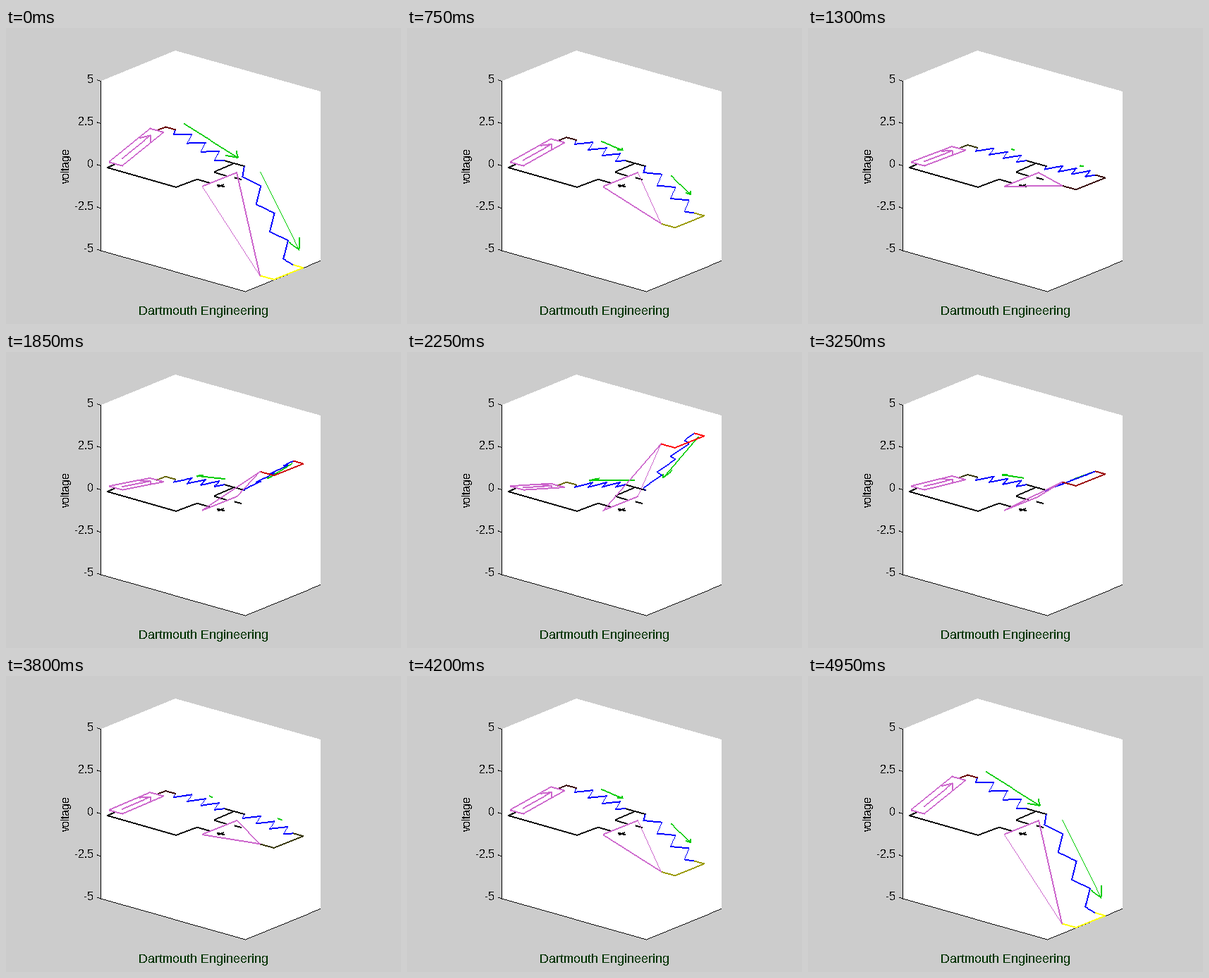
These frames come from a looping animation (560x420 px, 5 s). A matplotlib script:

```python
import numpy as np
import matplotlib.pyplot as plt
from matplotlib.animation import FuncAnimation

W, H, DPI = 560, 420, 100
FRAMES, INTERVAL = 100, 50
PX = 72 / DPI                  # one pixel in points
VOLT = 24.05                   # pixels per volt
GAIN = 5
SX, SY = 58 / 204, -44 / 107   # screen slopes of the two floor axes
BLACK, BLUE = (0, 0, 0), (0, 0, 1)
PINK, GREEN = (0.8, 0.4, 0.8), (0, 0.8, 0)
R_LEN, R_STEP, R_HALF = 69.6, 9.65, 8.2   # resistor length, zigzag step, half width

# Crisp, fully hinted text without smoothing
plt.rcParams.update({
    "font.family": "Liberation Sans",
    "text.hinting": "native",
    "text.hinting_factor": 1,
    "text.antialiased": False,
    "toolbar": "None",
})

fig = plt.figure(figsize=(W / DPI, H / DPI), dpi=DPI, facecolor="#cccccc")
ax = fig.add_axes([0, 0, 1, 1])
ax.axis("off")


def rail(x):
    """Floor height of the line that carries both resistors."""
    return 192 + SX * (x - 323)


def lift(points, z):
    return [(x, y - VOLT * z) for x, y in points]


def tilted(x, x0, v0, v1, side=0):
    """Point on a resistor's sloping plane, moved sideways by `side` pixels."""
    z = v0 + (v1 - v0) * (x - x0) / R_LEN
    return x + side, rail(x) + SY * side - VOLT * z


def resistor(x0, v0, v1):
    first = x0 + (R_LEN - 6 * R_STEP) / 2
    peaks = [tilted(first + k * R_STEP, x0, v0, v1, R_HALF * (-1) ** (k + 1))
             for k in range(7)]
    return [tilted(x0, x0, v0, v1), *peaks, tilted(x0 + R_LEN, x0, v0, v1)]


def current_arrow(x0, v0, v1, amps):
    drop = (v1 - v0) / GAIN
    length = 78 * amps / np.sqrt(1 + 1.05 * drop ** 2)
    mid, side = x0 + R_LEN / 2, 15.7
    tip, back = mid + length / 2, mid + length * 0.375

    def at(x, extra=0):
        return tilted(x, x0, v0, v1, side + extra)

    barb = 7.5 * amps
    return [at(mid - length / 2), at(tip)], [at(back, -barb), at(tip), at(back, barb)]


def source(vin):
    """Voltage source: a tilted strip with an arrow inside."""
    def at(u, d=0):
        return 155.5 + 58 * u + d, 193 - 23.8 * u + SX * d - VOLT * vin * u

    strip = [at(0, -9.5), at(1, -9.5), at(1, 9.5), at(0, 9.5), at(0, -9.5)]
    return strip, [at(0.16), at(0.85)], [at(0.716, -8), at(0.85), at(0.716, 8)]


def volt_color(v):
    """Red above ground, yellow below, black at zero, in steps of a fifth."""
    c = round(5 * min(1, np.sqrt(abs(v) / 5))) / 5
    return (c, 0, 0) if v > 0 else (c, c, 0)


WIRES = [
    [(155.5, 193), (143.5, 198), (241, 226), (271, 214.5), (289, 220)],
    [(309.5, rail(309.5)), (338, rail(338))],
    [(323, 192), (295, 204.5), (312, 210)],
    [(324, 212.3), (333.5, 215)],
    [(299.8, 222.7), (309, 225.3)],
    [(300.5, 225.4), (308.5, 222.4)],
]


def circuit(vout):
    vin = -vout / GAIN
    parts = []
    for x0, v0, v1 in ((240, vin, 0), (337.7, 0, vout)):
        parts += [(line, GREEN) for line in current_arrow(x0, v0, v1, vin)]
    parts += [(wire, BLACK) for wire in WIRES]
    parts.append((resistor(240, vin, 0), BLUE))
    parts.append((resistor(337.7, 0, vout), BLUE))
    lead = [(213.5, 169.5), (226, rail(226)), (240, rail(240))]
    parts.append((lift(lead, vin), volt_color(vin)))
    end = [(407.3, rail(407.3)), (421, rail(421)), (380, 236.7), (360, 231)]
    parts.append((lift(end, vout), volt_color(vout)))
    parts += [(line, PINK) for line in source(vin)]
    apex = lift([(360, 231)], vout)[0]
    parts.append(([(278, 225), (327, 205), apex, (278, 225)], PINK))
    return parts


def stroke(img, p, q, color, wide):
    """Hard-edged line, one or two pixels across its shorter direction."""
    dx, dy = abs(q[0] - p[0]), abs(q[1] - p[1])
    n = int(max(dx, dy)) + 2
    x, y = np.linspace(p[0], q[0], n), np.linspace(p[1], q[1], n)
    step = np.array([0.5, 0]) if dy > dx else np.array([0, 0.5])
    for side in (-1, 1) if wide else (0,):
        cols = np.floor(x + side * step[0]).astype(int)
        rows = np.floor(y + side * step[1]).astype(int)
        img[rows, cols] = color


def is_wide(p, q):
    """Medium steep strokes come out thin."""
    dx, dy = abs(q[0] - p[0]), abs(q[1] - p[1])
    return not 1.3 * dx < dy < 3 * dx


def make_box():
    img = np.full((H, W, 3), 0.8)
    row, col = np.mgrid[0:H, 0:W] + 0.5
    top = np.interp(col, [135, 240, 446], [75, 32, 90])
    bottom = np.interp(col, [135, 339.5, 446], [316, 374, 330.5])
    img[(col > 135) & (col < 446) & (row > top) & (row < bottom)] = 1
    corners = [(134.5, 75), (134.5, 316), (339.5, 374), (445.9, 330.5)]
    for p, q in zip(corners, corners[1:]):
        stroke(img, p, q, BLACK, False)
    for k in range(5):
        y = 75.3 + k * 2.5 * VOLT
        stroke(img, (129, y - 1.7), (134.5, y), BLACK, False)
    return img


def add_labels():
    for k, label in enumerate(("5", "2.5", "0", "-2.5", "-5")):
        ax.text(124.5, 78 + k * 2.5 * VOLT, label, size=16 * PX,
                ha="right", va="baseline")
    ax.text(85, 195, "voltage", size=16 * PX, rotation=90, ha="center", va="center")
    ax.text(279.5, 407, "Dartmouth Engineering", size=18 * PX,
            color=(0, 0.2, 0), ha="center", va="baseline")


box = make_box()
picture = ax.imshow(box, extent=(0, W, H, 0), interpolation="nearest",
                    aspect="auto", vmin=0, vmax=1)
add_labels()


def update(i):
    k = min(i, FRAMES - 1 - i)
    img = box.copy()
    for points, color in circuit(-5 + 10 * k / 49):
        for p, q in zip(points, points[1:]):
            stroke(img, p, q, color, is_wide(p, q))
    picture.set_data(img)
    return (picture,)


anim = FuncAnimation(fig, update, frames=FRAMES, interval=INTERVAL,
                     repeat=True, repeat_delay=0, blit=False)
plt.show()
```
